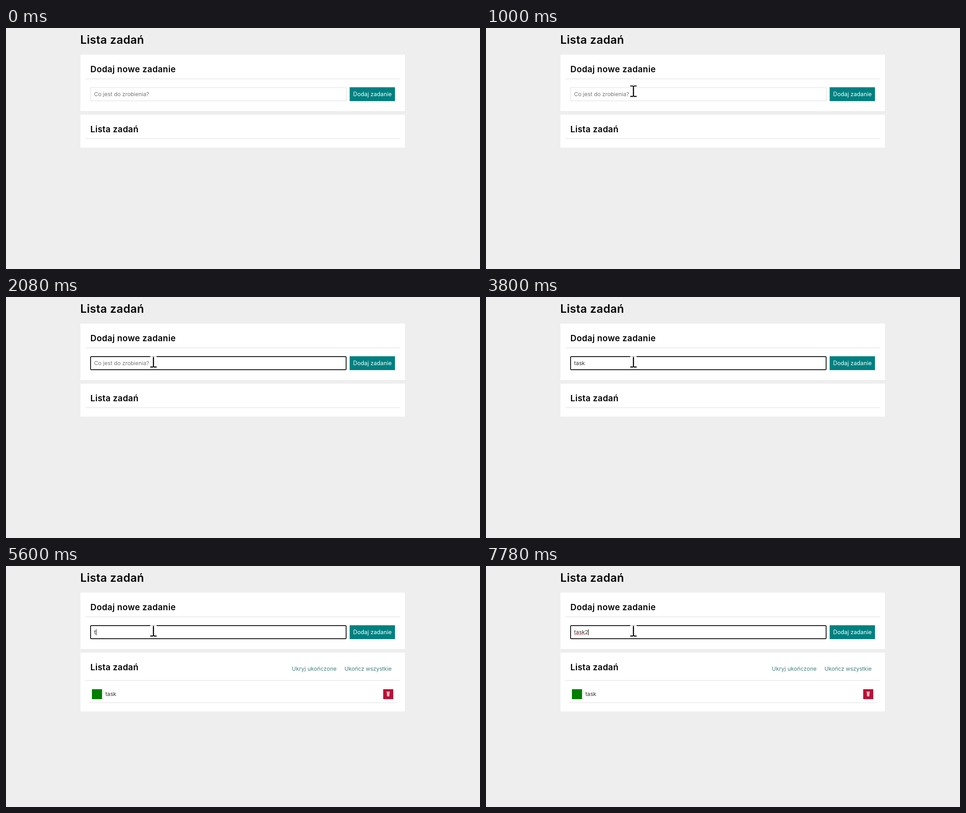
These frames come from a looping animation (1048 px wide and 534 px high, 8000 ms). An HTML page:

```html
<!DOCTYPE html>
<html lang="pl">
<head>
<meta charset="utf-8">
<title>Lista zadań</title>
<style>
  html, body { margin: 0; width: 100%; height: 100%; overflow: hidden; background: #eee; }
  svg { display: block; width: 1048px; height: 534px; }
  text { font-family: Inter, "Open Sans", sans-serif; font-size: 12.2px; white-space: pre; }
  .h1 { font-size: 25px; font-weight: 600; letter-spacing: .3px; }
  .h2 { font-size: 18.7px; font-weight: 600; letter-spacing: .4px; }
  .btn { font-size: 12.5px; letter-spacing: .1px; fill: #fff; }
  .link { fill: #3c7f7f; }
  .item { fill: #333; }
  .hint { fill: #757575; letter-spacing: .04px; }
  .rule { fill: #ddd; }
  #beam { mix-blend-mode: difference; fill: #fff; }
</style>
</head>
<body>
<svg viewBox="0 0 1048 534">
  <rect width="1048" height="534" fill="#eee"/>
  <text class="h1" x="164.3" y="35.4">Lista zadań</text>

  <rect x="164.5" y="59" width="717.5" height="125" fill="#fff"/>
  <text class="h2" x="186.6" y="98">Dodaj nowe zadanie</text>
  <rect class="rule" x="175.5" y="112.2" width="695.5" height="1"/>
  <rect id="field" fill="#fff"/>
  <text id="hint" class="hint" x="194.8" y="150.6">Co jest do zrobienia?</text>
  <text id="typed" class="item" x="194.8" y="150.6"></text>
  <path id="wave" fill="none" stroke="#d8434f" stroke-width=".9"/>
  <rect id="caret" y="140" width="1" height="13.5" fill="#111"/>
  <rect x="759.8" y="131.3" width="100.2" height="30.7" fill="#008080"/>
  <text class="btn" x="767.6" y="150.6">Dodaj zadanie</text>

  <rect id="panel" x="164.5" y="192" width="717.5" fill="#fff"/>
  <text class="h2" x="186.6" y="230.5" style="letter-spacing:.3px">Lista zadań</text>
  <rect id="listRule" class="rule" x="175.5" width="695.5" height="1"/>
  <g id="list">
    <text class="link" x="632" y="231.6" letter-spacing=".15">Ukryj ukończone</text>
    <text class="link" x="748.5" y="231.6">Ukończ wszystkie</text>
    <rect x="190" y="273" width="22.4" height="22" fill="#008000"/>
    <text class="item" x="219.8" y="288.2">task</text>
    <rect x="834" y="273" width="22.2" height="22" fill="#ba1037"/>
    <path d="M841.3 278.6h7.4v1.6h-7.4zM842 280.8h6l-.5 8h-5z" fill="#eedfe2"/>
    <path d="M843.9 281.5l.2 6.6M846.1 281.5l-.2 6.6" stroke="#b06a78" stroke-width=".7"/>
    <rect class="rule" x="183" y="302.3" width="681" height="1"/>
  </g>

  <g id="beam">
    <path d="M-7-12.5h5.8l1.2 1.2 1.2-1.2H7v2H1.2v21H7v2.2H1.2L0 11.5l-1.2 1.2H-7v-2.2h5.8v-21H-7z"/>
  </g>
  <path id="arrow" d="M.7.8v20.4l4.7-4.4 3.2 7.5 3.3-1.4-3.2-7.3h6.4z"
        fill="#fff" stroke="#000" stroke-width="1.3" stroke-linejoin="round"/>
  <circle id="press" cx="328" cy="142" r="22" fill="#ff0" fill-opacity=".53"/>
</svg>
<script>
const LOOP = 8000;
const $ = id => document.getElementById(id);
const set = (id, attrs) => { for (const k in attrs) $(id).setAttribute(k, attrs[k]); };
const show = (id, on) => set(id, { visibility: on ? "visible" : "hidden" });
const within = (t, a, b) => t >= a && t < b;

// last entry whose time has come
const at = (steps, t) => steps.reduce((last, s) => (t >= s[0] ? s : last), null);

// time, x, y of the pointer
const pointer = [
  [310, 810, 389], [380, 640, 298], [450, 470, 200], [520, 350, 127],
  [580, 294, 93], [650, 304, 101.5], [720, 310, 108], [790, 316, 117],
  [860, 320, 126], [930, 324, 134], [1000, 326, 140], [1070, 328, 142],
  [1150, 330.5, 143.5], [1550, 328, 143.5], [1610, 326, 143.5]
];

const typing = [
  [0, ""], [2540, "t"], [2740, "ta"], [3020, "tas"], [3200, "task"], [4270, ""],
  [5600, "t"], [5800, "ta"], [6060, "tas"], [6390, "task"], [6790, "task2"]
];

const caretX = [195, 199, 206, 212, 219, 226];
const caretOn = [[1550, 2080], [2540, 3800], [4340, 4870], [5400, 7320], [7780, LOOP]];

let wave = "M195 152.4";
for (let i = 0; i < 12; i++) wave += `q1 ${i % 2 ? 1.8 : -1.8} 2.05 0`;
set("wave", { d: wave });

function drawPointer(t) {
  const p = at(pointer, t);
  const overText = p && p[2] < 104 || p && p[2] >= 131 && p[2] <= 162 && p[1] < 753;
  show("beam", p && overText);
  show("arrow", p && !overText);
  if (p) set(overText ? "beam" : "arrow", { transform: `translate(${p[1]} ${p[2]})` });
  show("press", within(t, 1480, 1680));
}

function drawField(t) {
  const text = at(typing, t)[1];
  const focus = t >= 1550;
  set("field", focus
    ? { x: 187, y: 132.2, width: 565, height: 29, rx: 1.5, stroke: "#000", "stroke-width": 1.7 }
    : { x: 186.8, y: 132, width: 565.7, height: 29.5, rx: 0, stroke: "#ddd", "stroke-width": 1 });
  $("typed").textContent = text;
  show("hint", !text);
  show("wave", t >= 7780);
  show("caret", caretOn.some(([a, b]) => within(t, a, b)));
  set("caret", { x: caretX[text.length] });
}

function drawList(t) {
  const filled = t >= 4270;
  show("list", filled);
  set("panel", { height: filled ? 130.3 : 73 });
  set("listRule", { y: filled ? 253 : 244.6 });
}

function frame() {
  const t = performance.now() % LOOP;
  drawPointer(t);
  drawField(t);
  drawList(t);
  requestAnimationFrame(frame);
}
frame();
</script>
</body>
</html>
```
